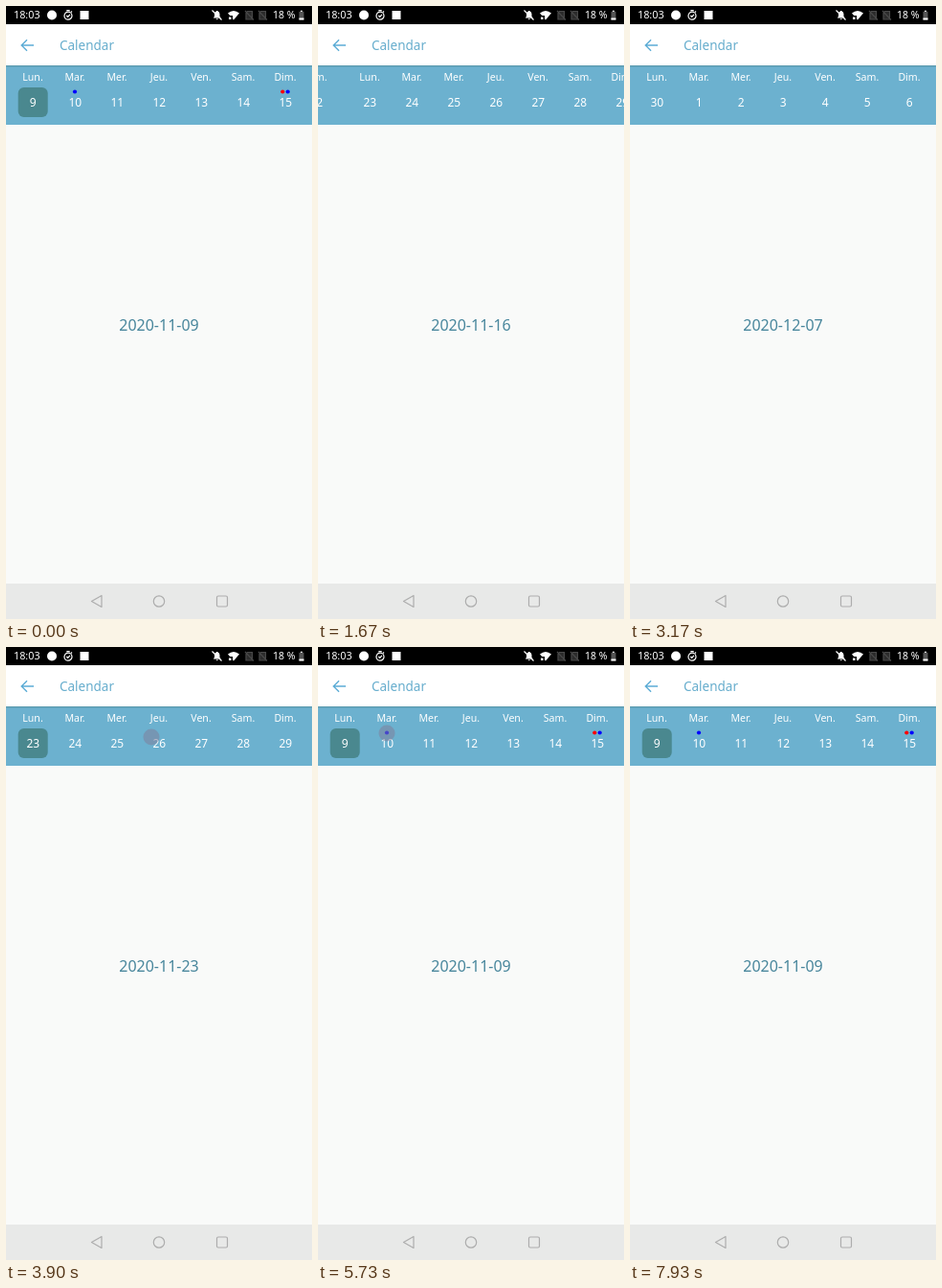
Recreate the animation shown at these times as an HTML page. Size 320 by 640 pixels, loop 7.96 s.

```html
<!DOCTYPE html>
<html lang="fr">
<head>
<meta charset="utf-8">
<title>Calendar</title>
<style>
  html, body { margin: 0; width: 100%; height: 100%; overflow: hidden; background: #f9faf9; }
  svg { display: block; width: 320px; height: 640px; font-family: "Noto Sans", "Open Sans", sans-serif; }
  #strip text, #date { text-anchor: middle; }
  #strip { fill: #fff; }
  .label { font-size: 10.6px; }
  .number { font-size: 12px; }
  .line { fill: none; stroke-width: 1.2; }
</style>
</head>
<body>
<svg viewBox="0 0 320 640">
  <rect width="320" height="640" fill="#f9faf9"/>

  <!-- week strip -->
  <rect y="62" width="320" height="62" fill="#6cb1cf"/>
  <g id="strip"><rect id="mark" y="85" width="31" height="31" rx="6" fill="#4a888f"/></g>

  <!-- status bar -->
  <rect width="320" height="19"/>
  <g fill="#fff" font-size="10.8">
    <text x="8" y="13.4">18:03</text>
    <text x="279" y="13.4" font-size="10.5">18 %</text>
    <circle cx="48" cy="9.5" r="5"/>
    <rect x="77.5" y="5" width="9" height="9"/>
    <path d="M217 12.5V12l1-1V8.500q0-2.500 2-3V5h1.500v.5q2 .5 2 3V11l1 1v.5zM219.500 13.200h2.500l-1.200 1.300z"/>
    <path d="M232 7.500q6-5 12 0L238 14.500z"/>
    <path d="M232 10h5v5h-5z" fill="#000"/>
    <path d="M233 11.500h2.500v2.500H233z"/>
    <rect x="306.500" y="6" width="5" height="8.500" fill="#555"/>
    <path d="M308 4.800h2V6h-2zM306.500 12.500h5v2h-5z"/>
  </g>
  <g class="line" stroke="#fff">
    <circle cx="65" cy="10.200" r="4"/>
    <path d="M63.300 4.700h3.400M63.300 10l1.400 1.400 2.200-2.500M68 6.500l1-1"/>
    <path d="M215.500 4.500l10 10"/>
    <path id="sim" fill="#2c2c2c" stroke="#494949" d="M252.500 5.500h5v8.500h-6.500V7.500zM250 5l9 9.500"/>
    <use href="#sim" x="14"/>
  </g>

  <!-- header -->
  <rect y="19" width="320" height="43" fill="#fff"/>
  <rect y="62" width="320" height="1" fill="#4f8a9c" opacity=".6"/>
  <rect y="63" width="320" height="1" fill="#4f8a9c" opacity=".25"/>
  <path d="M29 41H16.500M22 35.200L16.200 41l5.800 5.800" class="line" stroke="#5cacd6" style="stroke-width:1.4"/>
  <text x="56" y="45.800" font-size="13.5" fill="#66adcd">Calendar</text>

  <text id="date" x="160" y="339" font-size="16" fill="#48869c"></text>

  <!-- navigation bar -->
  <rect y="603" width="320" height="37" fill="#e8e9e8"/>
  <g class="line" stroke="#adadad">
    <path d="M89.500 621.500l10.500-6v12z" stroke-linejoin="round"/>
    <circle cx="160" cy="621.500" r="5.700"/>
    <rect x="220.500" y="616" width="11" height="11" rx="1.500"/>
  </g>

  <circle id="touch" r="8.500" fill="#80809c" opacity=".55"/>
</svg>
<script>
const LOOP = 7960, PAGE = 320, FPS = 30;
const NAMES = ["Lun.", "Mar.", "Mer.", "Jeu.", "Ven.", "Sam.", "Dim."];
// [start, week reached]
const SWIPES = [[670, 1], [1530, 2], [1930, 3], [2430, 4], [2970, 3], [3400, 2],
  [3900, 1], [4530, 0], [6800, 1], [7530, 0]];
// [start, day]; days count from 9 November
const TAPS = [[5070, 6], [5470, 0], [5700, 1], [5970, 3], [6400, 2]];
const PICKS = [[0, 0], [1030, 7], [1930, 14], [2300, 21], [2800, 28], [3330, 21],
  [3770, 14], [4270, 7], [4900, 0], ...TAPS.map(([s, day]) => [s + 95, day]),
  [7130, 7], [7870, 0]];

const get = id => document.getElementById(id);
const [strip, mark, dateText, touch] = ["strip", "mark", "date", "touch"].map(get);
const dayX = day => PAGE * Math.floor(day / 7) + 28 + 44 * (day % 7);
const isoDate = day => new Date(Date.UTC(2020, 10, 9 + day)).toISOString().slice(0, 10);

function add(tag, attrs, text = "") {
  const el = document.createElementNS("http://www.w3.org/2000/svg", tag);
  for (const key in attrs) el.setAttribute(key, attrs[key]);
  el.textContent = text;
  strip.append(el);
}

for (let day = 0; day < 35; day++) {
  const x = dayX(day);
  add("text", { x, y: 78, class: "label" }, NAMES[day % 7]);
  add("text", { x: x + .3, y: 105.3, class: "number" }, +isoDate(day).slice(8));
}
for (const [day, dx, fill] of [[1, 0, "#00f"], [6, -2.7, "#f00"], [6, 2.7, "#00f"]])
  add("circle", { cx: dayX(day) + dx, cy: 89.5, r: 2.1, fill });

const hold = t => Math.round(Math.floor((t + 4) * FPS / 1000) * 100 / FPS) * 10;

// Touch, then a decelerating fling onto the next page
function ease(time) {
  const u = Math.min(1, Math.max(0, (time - 30) / 170));
  return 1 - (1 - u) ** 2.41;
}

function draw(t) {
  let week = 0, finger = null;
  for (const [start, to] of SWIPES) {
    if (t < start) break;
    const step = (to - week) * ease(t - start);
    if (t < start + 75) finger = [(to < week ? 152 : 215) - PAGE * step, 94];
    week += step;
  }
  for (const [start, day] of TAPS)
    if (t >= start && t < start + 95) finger = [dayX(day), 90];

  const picked = PICKS.findLast(([start]) => t >= start)[1];
  strip.setAttribute("transform", `translate(${-PAGE * week} 0)`);
  mark.setAttribute("x", dayX(picked) - 15.3);
  dateText.textContent = isoDate(picked);
  touch.style.display = finger ? "" : "none";
  if (finger) touch.setAttribute("transform", `translate(${finger})`);
}

const began = performance.now();
function frame() {
  draw(hold((performance.now() - began) % LOOP));
  requestAnimationFrame(frame);
}
frame();
</script>
</body>
</html>
```
